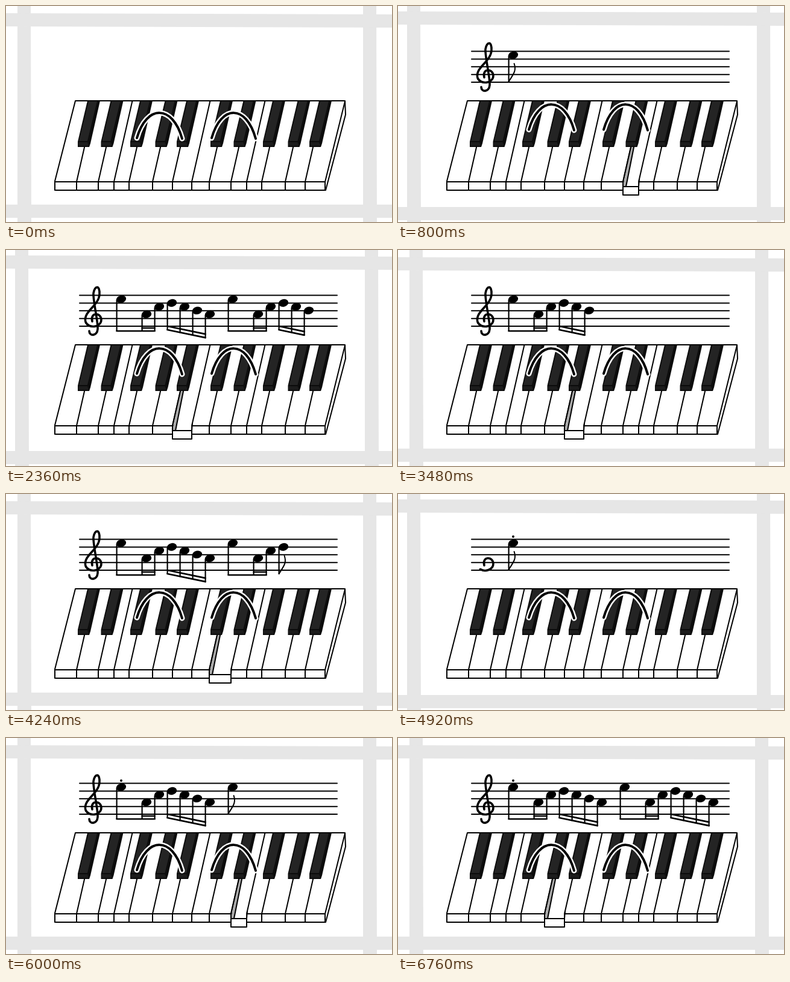
Write an HTML page with a canvas that moves like this. It is 640 px wide and 360 px high and loops after 6.8 s.

```html
<!DOCTYPE html>
<html lang="en">
<head>
<meta charset="utf-8">
<title>Piano loop</title>
<style>
html, body { margin: 0; width: 100%; height: 100%; overflow: hidden; background: #fff; }
canvas { display: block; }
</style>
</head>
<body>
<canvas width="640" height="360"></canvas>
<script>
const c = document.querySelector('canvas').getContext('2d');

// all times in ms
const LOOP = 6800;
const INTRO = 160;
const FIRST = 555; // first note of the first take
const TAKE = 2140; // from one take to the next
const LEAD = 85; // the clef starts this long before the first note
const BEAT = 127.5;

const BAR_GAP = 185;
const FRONT = 293, BACK = 158, BLACK_END = 235;
const SLANT = 0.226;
const FILM = 1000 / 24;

const melody = [9, 5, 7, 8, 7, 6, 5]; // white keys counted from the left
const octave = [0, 29, 65, 91, 116, 155, 188]; // left borders of C to B

const border = key => 88 + 220 * Math.floor(key / 7) + octave[key % 7];
const isPlain = key => key % 7 === 0 || key % 7 === 3; // no black key here
const lineTop = key => isPlain(key) ? BACK : BLACK_END;
const lean = y => (FRONT - y) * SLANT;

// an eighth note, then six sixteenths in each bar
const beatOf = i => 8 * Math.floor(i / 7) + (i % 7 ? i % 7 + 1 : 0);
const headX = i => 191 + 21 * beatOf(i);
const headY = i => 82 + (9 - melody[i]) * 6.3;
const stemX = i => headX(i) - 7.4;
const beamY = x => 133 + (x - 267.6) * 0.21;

const clefShape = 'M143 119C139 104 157 103 158 116C158 129 137 132 132 120' +
  'C127 103 154 93 155 74C156 58 147 59 145 72C144 84 153 120 152 132C151 144 138 144 138 135';
const clef = new Path2D(clefShape);
const svgPath = document.createElementNS('http://www.w3.org/2000/svg', 'path');
svgPath.setAttribute('d', clefShape);
const clefLength = svgPath.getTotalLength();

function trace(points) {
  c.beginPath();
  for (let i = 0; i < points.length; i += 2) c.lineTo(points[i], points[i + 1]);
}

function line(width, ...points) {
  trace(points);
  c.lineWidth = width;
  c.stroke();
}

function fill(color, ...points) {
  trace(points);
  c.fillStyle = color;
  c.fill();
}

function disc(x, y, rx, ry, turn = 0) {
  c.beginPath();
  c.ellipse(x, y, rx, ry, turn, 0, 7);
  c.fillStyle = '#000';
  c.fill();
}

function drawGrid(shifted) {
  const [left, right, top, bottom] = shifted ? [15, 595, 9, 335] : [19, 592, 12, 331];
  const gray = '#e6e6e6';
  for (const x of [left, right]) fill(gray, x, 0, x + 22, 0, x + 23, 360, x, 360);
  fill(gray, 0, top, 640, top + 2, 640, top + 24, 0, top + 22);
  fill(gray, 0, bottom, 640, bottom, 640, bottom + 22, 0, bottom + 22);
}

function drawPressed(key) {
  const x = border(key), end = border(key + 1);
  const top = lineTop(key), topX = x + lean(top);
  fill('#fff', x + 3, 289, end - 1, 289, end, 315, x, 315);
  fill('#aaa', topX, top, topX + 5, top, x + 5, 301, x, 301);
  line(2, topX, top, x, FRONT, x, 301);
  line(2, topX + 5, top, x + 5, 301);
  line(2, end + 1, 289, end, 301);
  c.strokeRect(x, 301, end - x, 14);
}

function drawBlack(key) {
  // within a group the black keys drift to the right
  const x = border(key) + 2.5 * (key % 7 < 3 ? key % 7 : key % 7 - 3) - 0.5;
  fill('#0c0c0c', x, 235, x, 226, x + 16, 158, x + 37, 158, x + 21, 229, x + 19, 235);
  fill('#242424', x + 2, 225, x + 18, 159, x + 32, 159, x + 16, 225);
  fill('#1c1c1c', x + 1, 233, x + 1, 227, x + 16, 227, x + 18, 233);
}

function drawKeyboard(pressed) {
  fill('#fff', 115, 158, 562, 158, 563, 181, 530, 307, 81, 307, 81, 292);
  line(2, 81, 307, 81, 292, 115, 158, 562, 158, 563, 181, 530, 307, 81, 307);
  line(2, 81, FRONT, 529, FRONT, 562, 159);
  line(2, 529, FRONT, 529, 307);
  for (let key = 1; key < 14; key++) {
    const x = border(key), top = lineTop(key);
    line(2, x + lean(top), top, x, FRONT, x, 307);
  }
  if (pressed) drawPressed(pressed);
  for (let key = 1; key < 14; key++) if (!isPlain(key)) drawBlack(key);
}

function drawArches(high) {
  const y = high ? 206 : 220;
  for (const [x, end] of [[217, 292], [341, 414]]) {
    c.beginPath();
    c.moveTo(x, y);
    c.bezierCurveTo(x + 16, y - 56, end - 16, y - 56, end, y + 1);
    for (const [color, width] of [['#fff', 9], ['#000', 4]]) {
      c.strokeStyle = color;
      c.lineWidth = width;
      c.stroke();
    }
  }
}

function drawFlag(x, y) {
  c.beginPath();
  c.moveTo(x, y);
  c.bezierCurveTo(x + 8, y - 13, x + 13, y - 18, x + 9, y - 30);
  c.lineWidth = 2;
  c.stroke();
}

function drawBar(count) {
  for (let i = 0; i < count; i++) {
    const x = stemX(i);
    const foot = i > 2 ? beamY(x) : count === 1 ? 126 : 135;
    line(2.2, x, headY(i) + 2, x, foot);
    disc(headX(i), headY(i), 8.3, 6.3, -0.25);
  }
  if (count === 1) drawFlag(stemX(0), 126);
  if (count > 1) line(2.6, stemX(0), 135, stemX(Math.min(count, 3) - 1), 135);
  if (count > 2) line(2.6, stemX(1), 130, stemX(2), 130);
  if (count === 4) drawFlag(stemX(3), 133);
  if (count > 4) {
    const from = stemX(3), to = stemX(count - 1);
    for (const up of [0, 6]) line(2.8, from, beamY(from) - up, to, beamY(to) - up);
  }
}

function drawScore(t, clefTime, count, staccato) {
  const width = 427 * Math.min(1, (t - INTRO + 10) / 170);
  for (let i = 0; i < 5; i++) line(2, 122, 75.5 + 12.9 * i, 122 + width, 75.5 + 12.9 * i);

  // the clef is drawn in eight steps, slowly at first
  const step = Math.min(8, Math.floor(clefTime / (2 * FILM)) + 1);
  c.setLineDash([clefLength * (step / 8) ** 1.4, 999]);
  c.lineWidth = 3.6;
  c.stroke(clef);
  c.setLineDash([]);

  drawBar(Math.min(count, 7));
  if (staccato && count) disc(191, 71, 2, 2);
  c.save();
  c.translate(BAR_GAP, 0);
  drawBar(Math.max(count - 7, 0));
  c.restore();
}

function frame(now) {
  const t = now % LOOP;
  const take = Math.max(0, Math.floor((t + LEAD - FIRST) / TAKE));
  const first = FIRST + take * TAKE;
  const staccato = take === 2;

  let count = 0;
  while (count < 14 && first + beatOf(count) * BEAT <= t) count++;
  const held = t - first - beatOf(count - 1) * BEAT;
  const limit = staccato && count === 1 ? 75 : count === 14 ? BEAT : 2 * BEAT;
  const pressed = count && held < limit ? melody[(count - 1) % 7] : 0;

  c.fillStyle = '#fff';
  c.fillRect(0, 0, 640, 360);
  c.strokeStyle = '#000';
  c.lineCap = c.lineJoin = 'round';
  drawGrid(Math.floor(t / (10 * FILM)) % 2);
  if (t >= INTRO - 10) drawScore(t, t - (take ? first - LEAD : INTRO - 10), count, staccato);
  drawKeyboard(pressed);
  // the arches rest low until the loop restarts
  const swing = Math.min(19, Math.floor((t - 3 * FILM) / (8 * FILM)));
  drawArches(swing >= 0 && swing % 2 === 0);
  requestAnimationFrame(frame);
}
requestAnimationFrame(frame);
</script>
</body>
</html>
```
